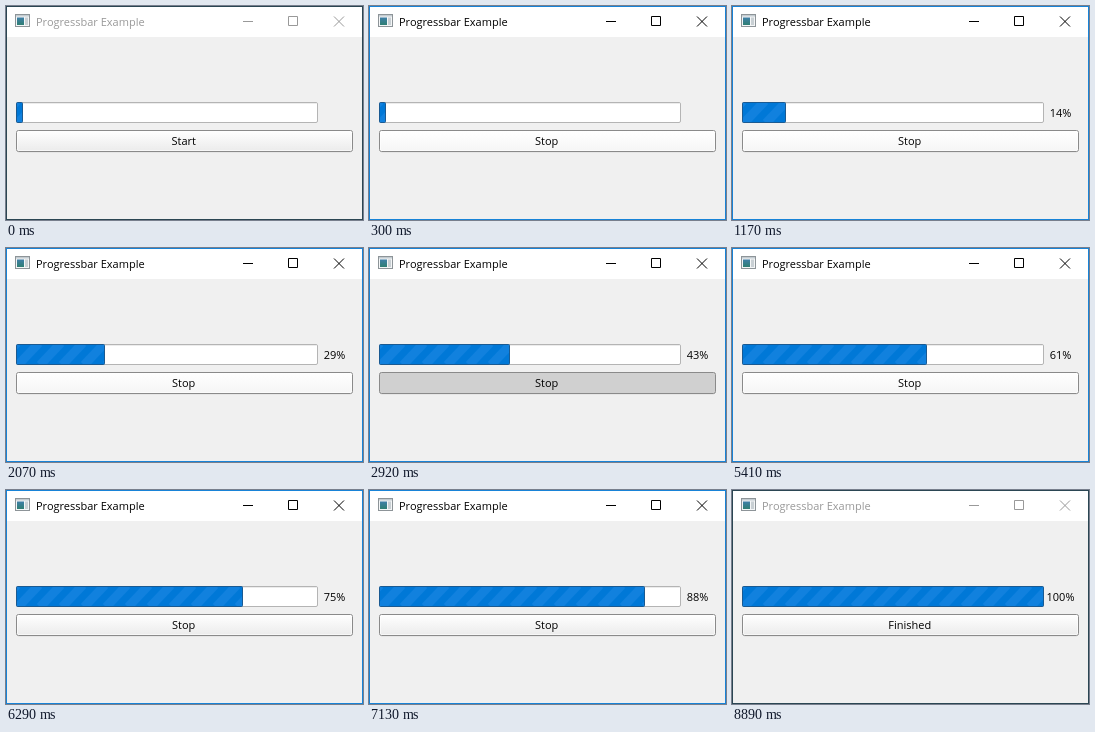
Animation, 357 px wide and 214 px high, one loop 9040 ms. Source, as an HTML page:

```html
<!DOCTYPE html>
<html lang="en">
<head>
<meta charset="utf-8">
<title>Progressbar Example</title>
<style>
  html, body { margin: 0; width: 100%; height: 100%; overflow: hidden; background: #f0f0f0; }
  svg { display: block; }
  text { font: 11px "Open Sans", "Noto Sans", sans-serif; }
  .mid { text-anchor: middle; }
  .line { fill: none; stroke: var(--ink); }
  #win { --ink: #000; --edge: #1883d7; }
  #win.idle { --ink: #999; --edge: #2b4653; }
</style>
</head>
<body>
<svg id="win" class="idle" width="357" height="214" viewBox="0 0 357 214">
  <defs>
    <linearGradient id="normal" x2="0" y2="1">
      <stop stop-color="#fff"/><stop offset="1" stop-color="#ebebeb"/>
    </linearGradient>
    <linearGradient id="hover" x2="0" y2="1">
      <stop stop-color="#fff"/><stop offset="1" stop-color="#f5f5f5"/>
    </linearGradient>
    <linearGradient id="pane" x2="0" y2="1">
      <stop stop-color="#3f7fa8"/><stop offset="1" stop-color="#2f7f73"/>
    </linearGradient>
    <clipPath id="clip"><rect id="inner" x="11" y="97" height="19"/></clipPath>
  </defs>

  <rect width="357" height="214" fill="#f0f0f0"/>
  <rect width="357" height="31" fill="#fff"/>
  <rect x=".5" y=".5" width="356" height="213" fill="none" stroke="var(--edge)"/>

  <rect x="9.5" y="8.5" width="14" height="12" fill="#f4f6f7" stroke="#8d9498"/>
  <rect x="10" y="9" width="13" height="1.5" fill="#c3cbd0"/>
  <rect x="11" y="11.5" width="7" height="7.5" fill="url(#pane)"/>
  <rect x="19" y="11.5" width="3" height="7.5" fill="#c9d0d4"/>

  <text x="30" y="20" fill="var(--ink)">Progressbar Example</text>
  <path class="line" d="M237 15.5h10M282.5 10.5h9v9h-9z"/>
  <path class="line" d="M328 10.5l10 10M338 10.5l-10 10"/>

  <rect x="10.5" y="96.5" width="301" height="20" rx="1.5" fill="#fff" stroke="#b4b4b4"/>
  <path d="M11 97.5h300" stroke="#ececec"/>
  <rect id="chunk" x="10.5" y="96.5" height="20" rx="1" fill="#0078d7" stroke="#1a5a92"/>
  <g clip-path="url(#clip)"><path id="stripes" stroke="#1181de" stroke-width="9"/></g>
  <text id="pct" class="mid" x="328.5" y="111"></text>

  <path d="M12 146.5h333" stroke="#e6e6e6"/>
  <rect id="btn" x="10.5" y="124.5" width="336" height="21" rx="2" stroke="#8a8a8a"/>
  <rect id="shine" x="11.5" y="125.5" width="334" height="19" rx="1" fill="none" stroke="#fff" stroke-opacity=".6"/>
  <text id="label" class="mid" x="177.7" y="139"></text>
</svg>
<script>
const LOOP = 9040;
// [step, ms]; the steps between two marks are evenly spaced
const MARKS = [
  [0, 0], [1, 230], [2, 300], [3, 350], [15, 1090], [16, 1170], [31, 2070],
  [32, 2150], [46, 2970], [47, 4210], [48, 4290], [61, 5080], [62, 5160],
  [66, 5410], [67, 5460], [76, 6040], [77, 6100], [91, 6990], [92, 7060],
  [93, 7130], [94, 7200], [106, 7930], [107, 8890]
];
const PRESSED = [1, 44, 45, 47];
const $ = id => document.getElementById(id);

const times = [0];
MARKS.slice(1).forEach(([step, ms], i) => {
  const [from, start] = MARKS[i];
  for (let n = from + 1; n <= step; n++)
    times[n] = Math.round((start + (ms - start) * (n - from) / (step - from)) / 10) * 10;
});

let d = "";
for (let x = -10; x < 312; x += 22) d += `M${x} 117l21 -22`;
$("stripes").setAttribute("d", d);

function percent(n) {
  return n < 47 ? Math.max(0, Math.min(43, n - 2)) : Math.max(43, Math.min(100, n - 5));
}

function caption(n) {
  if (n >= 106) return "Finished";
  return n < 2 || n === 46 || n === 47 ? "Start" : "Stop";
}

function face(n) {
  if (PRESSED.includes(n)) return "#d0d0d0";
  return n > 0 && n < 77 ? "url(#hover)" : "url(#normal)";
}

function draw(n) {
  const p = percent(n);
  const width = Math.max(6, 1 + 3 * p);
  $("win").classList.toggle("idle", n === 0 || n === 107);
  $("chunk").setAttribute("width", width);
  $("inner").setAttribute("width", width - 1);
  $("pct").textContent = p ? p + "%" : "";
  $("label").textContent = caption(n);
  $("btn").setAttribute("fill", face(n));
  $("shine").setAttribute("visibility", PRESSED.includes(n) ? "hidden" : "visible");
}

let shown = -1;
const begin = performance.now();
function tick() {
  const t = (performance.now() - begin) % LOOP;
  let n = times.length - 1;
  while (times[n] > t) n--;
  if (n !== shown) draw(shown = n);
  requestAnimationFrame(tick);
}
tick();
</script>
</body>
</html>
```
